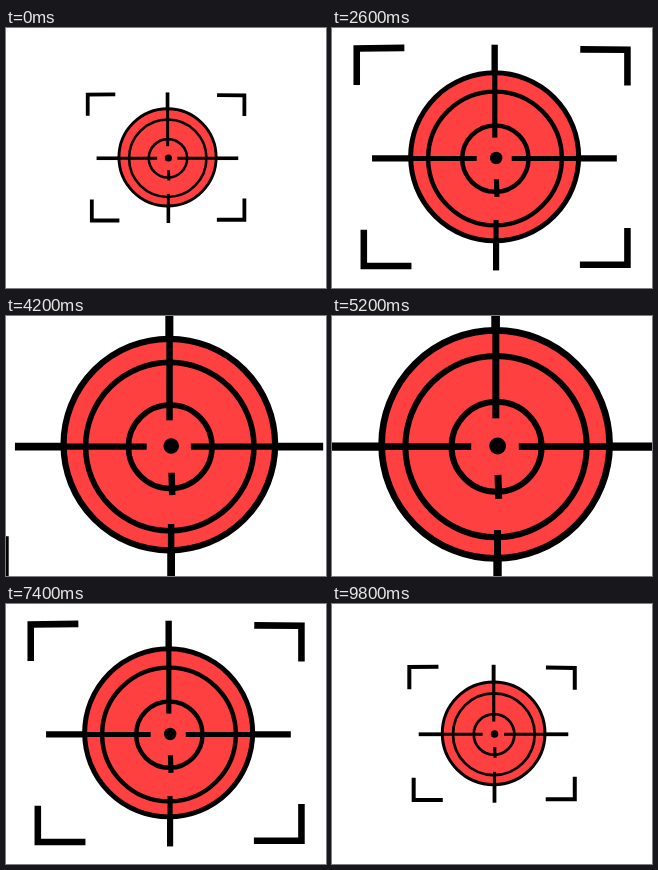
These frames come from a looping animation (320 by 260 pixels, 10 s). An HTML page with a canvas:

```html
<!DOCTYPE html>
<html lang="en">
<head>
<meta charset="utf-8">
<title>Pulsing target</title>
<style>
  html, body { margin: 0; width: 100%; height: 100%; overflow: hidden; background: #fff; }
  canvas { display: block; width: 100%; height: 100%; }
</style>
</head>
<body>
<canvas id="stage" width="320" height="260"></canvas>
<script>
const W = 320, H = 260;
const STEP = 200, STEPS = 50;
const RED = '#ff4040', BLACK = '#000';
const ctx = document.getElementById('stage').getContext('2d');

function disc(x, y, r, color) {
  ctx.fillStyle = color;
  ctx.beginPath();
  ctx.arc(x, y, r, 0, Math.PI * 2);
  ctx.fill();
}

function ring(x, y, r, width) {
  ctx.lineWidth = width;
  ctx.beginPath();
  ctx.arc(x, y, r - width / 2, 0, Math.PI * 2);
  ctx.stroke();
}

function line(width, ...pts) {
  ctx.lineWidth = width;
  ctx.beginPath();
  for (let i = 0; i < pts.length; i += 2) ctx.lineTo(pts[i], pts[i + 1]);
  ctx.stroke();
}

function drawTarget() {
  ctx.strokeStyle = BLACK;
  disc(163, 128.7, 95, RED);
  ring(163, 128.7, 97.7, 5.6);
  ring(163.4, 130.5, 78, 5);
  ring(163.8, 130.7, 40, 5);
  disc(164.7, 130, 7, BLACK);

  // Crosshair: heavier outside the disc than inside
  line(7, 24.5, 130.5, 68, 130.5);
  line(5.6, 66, 130.5, 142.7, 130.5);
  line(5.6, 182.3, 130.5, 260, 130.5);
  line(7, 258, 130.5, 301, 130.5);
  line(7.2, 163, 2, 163, 34);
  line(5.8, 163.2, 32, 163.2, 107);
  line(5.8, 165, 154, 165.6, 174);
  line(5.8, 164.6, 200, 164.6, 226);
  line(7, 164.6, 224, 164.6, 257);

  // Corner brackets
  line(7.4, 7.2, 47.5, 7.2, 6.3, 61, 5.6);
  line(7.4, 259.7, 7.3, 313, 7.8, 313, 48);
  line(7.4, 15.2, 211, 15.2, 252, 69, 252);
  line(7.4, 259.3, 250.5, 313, 250.5, 313, 209);
}

function frame(now) {
  const n = Math.floor(now / STEP) % STEPS;
  const radius = 50 + 2.8 * (25 - Math.abs(25 - n));
  const k = radius / 97.6;

  ctx.setTransform(1, 0, 0, 1, 0, 0);
  ctx.fillStyle = '#fff';
  ctx.fillRect(0, 0, W, H);
  ctx.translate(W / 2, H / 2);
  ctx.scale(k, k);
  ctx.translate(-W / 2, -H / 2);
  drawTarget();
  requestAnimationFrame(frame);
}

frame(performance.now());
</script>
</body>
</html>
```
